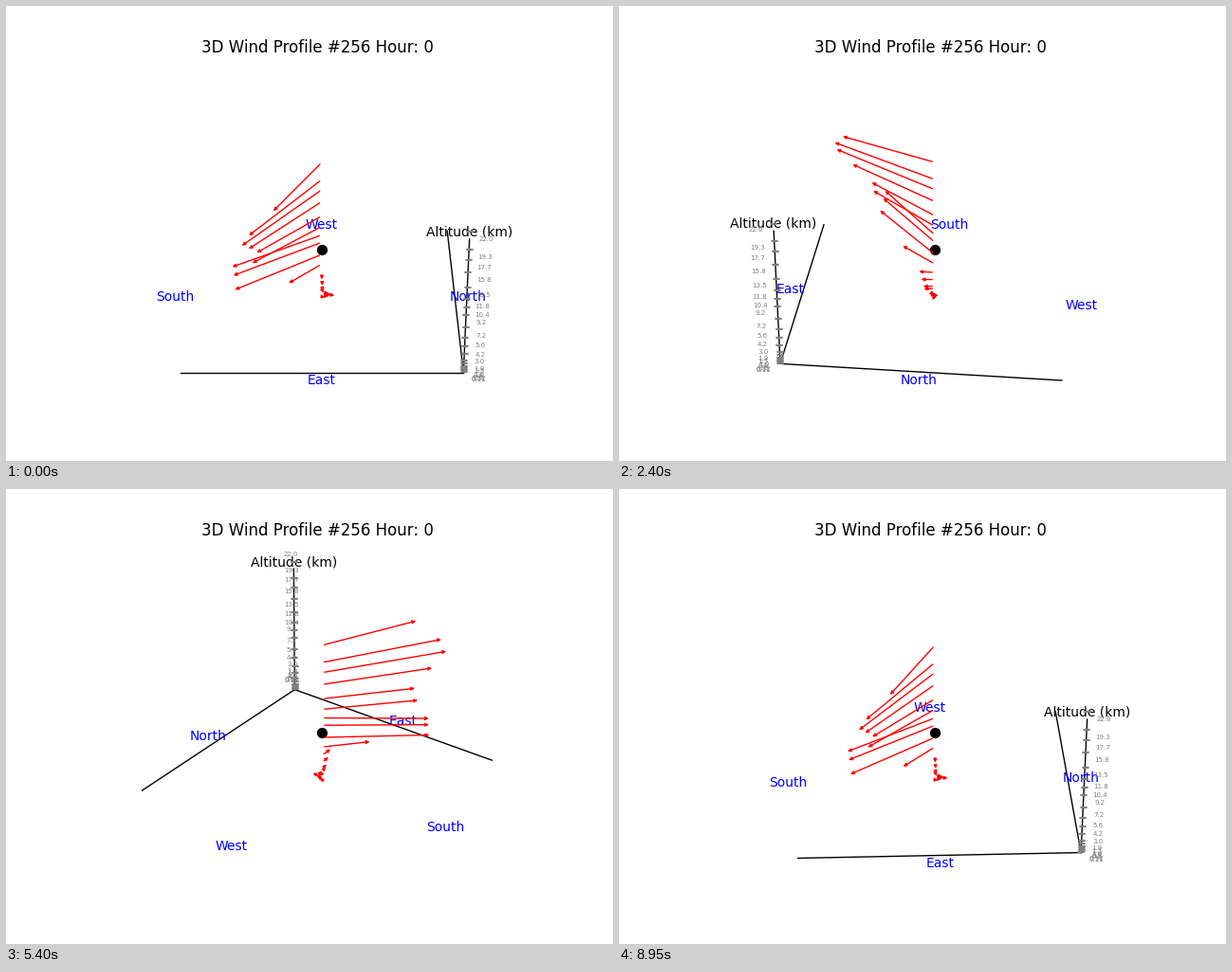
These frames come from a looping animation (640 px wide and 480 px high, 9000 ms). A matplotlib script:

```python
import numpy as np
import matplotlib.pyplot as plt
from matplotlib.animation import FuncAnimation
from matplotlib.patches import FancyArrowPatch

FRAMES, INTERVAL, STEP = 180, 50, 2
ELEV = np.radians(30)
DIST = 10
EDGE = 0.7165                  # half width of the floor
RING = 1.1 * EDGE              # labels stand a little outside it
GROUND, KM = -0.4127, 0.0374   # scene height of 0 km and of one km

PRESSURES = [*range(1000, 899, -25), 850, *range(800, 299, -100),
             *range(250, 99, -50), 70, 50, 27.6]

# key points of the wind: km, east, north
PROFILE = np.array([
    (0, 0, 0), (0.5, 0.009, 0.083), (1.5, 0.072, 0.013), (4.2, 0.1, 0),
    (5.6, 0.207, -0.185), (7.2, 0.366, -0.46), (10.4, 0.336, -0.472),
    (11.8, 0.389, -0.366), (13.5, 0.393, -0.342), (18.3, 0.62, -0.415),
    (22, 0.531, -0.248),
]).T


def altitude(hpa):
    """Barometric height in km, rounded for display."""
    km = 44.33 * (1 - (hpa / 1013.25) ** 0.1903)
    return round(km, 2 if km < 0.4 else 1)


def wind(km):
    heights, east, north = PROFILE
    return np.interp(km, heights, east), np.interp(km, heights, north)


def project(x, y, km, azim):
    """Perspective view of a point, in view-plane units."""
    z = GROUND + KM * km
    right = y * np.cos(azim) - x * np.sin(azim)
    near = x * np.cos(azim) + y * np.sin(azim)
    depth = DIST - near * np.cos(ELEV) - z * np.sin(ELEV)
    return right / depth, (z * np.cos(ELEV) - near * np.sin(ELEV)) / depth


fig = plt.figure(figsize=(6.4, 4.8), dpi=100)
side = 0.77 * 480
ax = fig.add_axes([(328 - side / 2) / 640, 0.11, side / 640, 0.77])
ax.set(xlim=(-0.095, 0.09), ylim=(-0.095, 0.09))
ax.axis("off")
ax.set_title("3D Wind Profile #256 Hour: 0")

texts, lines, arrows = [], [], []


def add_text(label, pos, **style):
    item = ax.text(0, 0, label, ha="center", va="center", **style)
    texts.append((item, pos))


corner = (EDGE, EDGE, 0)
for end in [(-EDGE, EDGE, 0), (EDGE, -EDGE, 0), (EDGE, EDGE, 20.9)]:
    lines.append((ax.plot([], [], color="black", lw=1)[0], corner, end))

for name, x, y in [("East", 1, 0), ("West", -1, 0), ("North", 0, 1), ("South", 0, -1)]:
    add_text(name, (x * RING, y * RING, 0), color="blue")

add_text("Altitude (km)", (EDGE, EDGE, 22), color="black")

for km in map(altitude, PRESSURES):
    add_text("-", (EDGE, EDGE, km), color="gray", fontsize=20)
    add_text(str(km), (RING, RING, km), color="gray", fontsize=5)
    arrow = FancyArrowPatch((0, 0), (1, 1), arrowstyle="-|>", mutation_scale=5,
                            lw=1, color="red", zorder=5)
    arrows.append((ax.add_patch(arrow), (0, 0, km), (*wind(km), km)))

ax.scatter(*project(0, 0, 8, 0), s=50, color="black", zorder=4)


def draw(frame):
    azim = np.radians(frame * STEP)
    for line, start, end in lines:
        line.set_data(*zip(project(*start, azim), project(*end, azim)))
    for item, pos in texts:
        item.set_position(project(*pos, azim))
    for arrow, start, end in arrows:
        arrow.set_positions(project(*start, azim), project(*end, azim))
    return []


anim = FuncAnimation(fig, draw, frames=FRAMES, interval=INTERVAL,
                     repeat=True, repeat_delay=0, blit=False)
plt.show()
```
